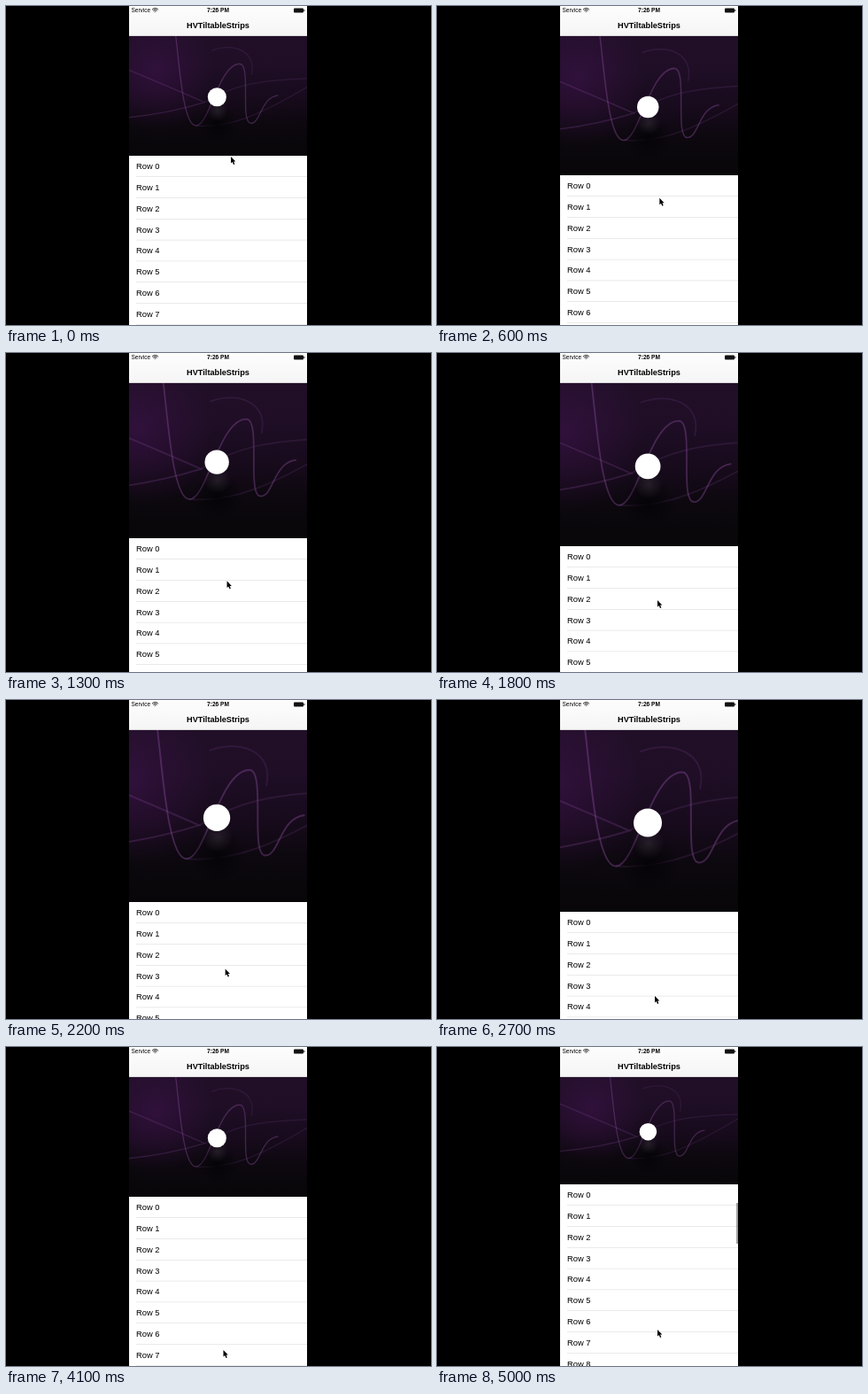
Recreate the animation shown at these times as an HTML page with a canvas. Size 480 by 360 pixels, loop 5100 ms.

```html
<!DOCTYPE html>
<html lang="en">
<head>
<meta charset="utf-8">
<title>Stretchy header list</title>
<style>
html, body { margin: 0; width: 100%; height: 100%; overflow: hidden; background: #000; }
canvas { display: block; }
</style>
</head>
<body>
<canvas id="stage" width="480" height="360"></canvas>
<script>
const ctx = document.getElementById('stage').getContext('2d');
const LOOP = 5100, STEP = 100;
const LEFT = 139, RIGHT = 340, MID = 239, NAV = 34;
const HEADER = 135, ROW = 23.8;
const RELEASE = 3.25, SPRING = 9;
const FONT = '"Liberation Sans", Arial, sans-serif';

// Pointer path: seconds, x, y
const pointerPath = [
  [0, 254, 170], [0.9, 250, 240], [1.8, 249, 279], [2.7, 246, 334],
  [3, 245.5, 342], [4.5, 245.5, 342], [5, 249, 319]
];

function pointerAt(t) {
  const i = Math.max(1, pointerPath.findIndex(p => p[0] >= t));
  const [t0, x0, y0] = pointerPath[i - 1], [t1, x1, y1] = pointerPath[i];
  const k = (t - t0) / (t1 - t0);
  return { x: x0 + (x1 - x0) * k, y: y0 + (y1 - y0) * k };
}

// Rubber-band resistance while dragging past the top
function rubberBand(distance) {
  const d = Math.max(0, distance) * 0.55;
  return d / (1 + d / 355);
}

function headerOffset(t, pointer) {
  if (t > 4.5) return -13.6 * (342 - pointer.y) / 23;
  const pull = rubberBand(pointer.y - 174.5);
  if (t < RELEASE) return pull;
  const s = SPRING * (t - RELEASE);
  return pull * (1 + s) * Math.exp(-s);
}

function rect(x, y, w, h, fill) {
  ctx.fillStyle = fill;
  ctx.fillRect(x, y, w, h);
}

function text(str, x, y, size, align = 'left', weight = 'normal') {
  ctx.font = `${weight} ${size}px ${FONT}`;
  ctx.textAlign = align;
  ctx.fillStyle = '#000';
  ctx.fillText(str, x, y);
}

function gradient(g, ...colors) {
  colors.forEach((c, i) => g.addColorStop(i / (colors.length - 1), c));
  return g;
}

function glow(x, y, r, inner, outer) {
  rect(x - r, y - r, 2 * r, 2 * r, gradient(ctx.createRadialGradient(x, y, 0, x, y, r), inner, outer));
}

function curve(d, color, width) {
  ctx.strokeStyle = color;
  ctx.lineWidth = width;
  ctx.stroke(new Path2D(d));
}

function drawHeader(height) {
  const scale = Math.max(height, 125) / 205;
  ctx.save();
  ctx.beginPath();
  ctx.rect(LEFT, NAV, RIGHT - LEFT, height);
  ctx.clip();
  ctx.translate(MID, NAV + height / 2);
  ctx.scale(scale, scale);
  rect(-170, -105, 340, 210,
    gradient(ctx.createLinearGradient(0, -103, 0, 103), '#210f28', '#1f0e26', '#180b1d', '#0c080e', '#080609'));
  glow(-105, -40, 100, 'rgba(66,20,80,.5)', 'rgba(66,20,80,0)');

  const faint = 'rgba(120,65,140,.2)', soft = 'rgba(120,65,140,.3)';
  curve('M-165 38 Q-90 32 -22 11 Q-65 -8 -165 -50', soft, 2);
  curve('M-22 11 C20 -15 60 -28 165 -30', faint, 2);
  curve('M-37 51 C20 55 70 35 165 -22', faint, 2);
  curve('M-10 -78 C25 -92 68 -78 58 -36', faint, 2);
  curve('M-72 -104 C-66 -60 -60 51 -37 51 C-14 51 2 -55 38 -55 C58 -55 38 47 57 47 C74 47 74 2 104 -1',
    'rgba(135,75,150,.42)', 2);

  glow(0, 48, 34, 'rgba(5,3,7,.95)', 'rgba(5,3,7,0)');
  glow(0, 25, 18, 'rgba(80,72,84,.35)', 'rgba(80,72,84,0)');
  ctx.fillStyle = '#fff';
  ctx.beginPath();
  ctx.arc(-1, 2, 16, 0, 2 * Math.PI);
  ctx.fill();
  ctx.restore();
}

function drawRows(top) {
  rect(LEFT, top, RIGHT - LEFT, 360 - top, '#fff');
  for (let i = 0; top + i * ROW < 360; i++) {
    const y = top + i * ROW;
    text('Row ' + i, 147, y + 15.1, 9.35);
    rect(147, y + ROW - 0.4, RIGHT - 147, 0.6, '#dcdcdc');
  }
}

function drawBar() {
  rect(LEFT, 0, RIGHT - LEFT, NAV, gradient(ctx.createLinearGradient(0, 0, 0, NAV), '#fdfdfd', '#f5f5f5'));
  rect(LEFT, NAV - 0.5, RIGHT - LEFT, 0.5, '#bbb');
  text('Service', 141.5, 7.3, 6.5);
  text('7:26 PM', MID + 0.5, 7.4, 6.6, 'center', 'bold');
  text('HVTiltableStrips', MID + 0.5, 25.3, 9.2, 'center', 'bold');

  ctx.strokeStyle = ctx.fillStyle = '#111';
  ctx.lineWidth = 1;
  for (const r of [1, 2.8, 4.6]) {
    ctx.beginPath();
    ctx.arc(168.5, 7.2, r, -Math.PI * 0.77, -Math.PI * 0.23);
    ctx.stroke();
  }
  ctx.beginPath();
  ctx.roundRect(325, 2.6, 11, 4.8, 1);
  ctx.fill();
  rect(336.4, 4, 0.9, 2, '#111');
}

function drawPointer({ x, y }) {
  ctx.save();
  ctx.translate(x, y);
  const arrow = new Path2D('M0 0V7.6L1.7 6.1L3 9L4.3 8.4L3.1 5.6H5.3Z');
  ctx.strokeStyle = '#fff';
  ctx.lineWidth = 1;
  ctx.stroke(arrow);
  ctx.fillStyle = '#000';
  ctx.fill(arrow);
  ctx.restore();
}

function draw(now) {
  const t = Math.floor(now % LOOP / STEP) * STEP / 1000;
  const pointer = pointerAt(t);
  const height = Math.round(HEADER + headerOffset(t, pointer));
  rect(0, 0, 480, 360, '#000');
  drawHeader(height);
  drawRows(NAV + height);
  drawBar();
  if (t > 4.5) rect(338.5, 176, 1, 46, '#444');
  drawPointer(pointer);
}

const start = performance.now();
function tick() {
  draw(performance.now() - start);
  requestAnimationFrame(tick);
}
tick();
</script>
</body>
</html>
```
